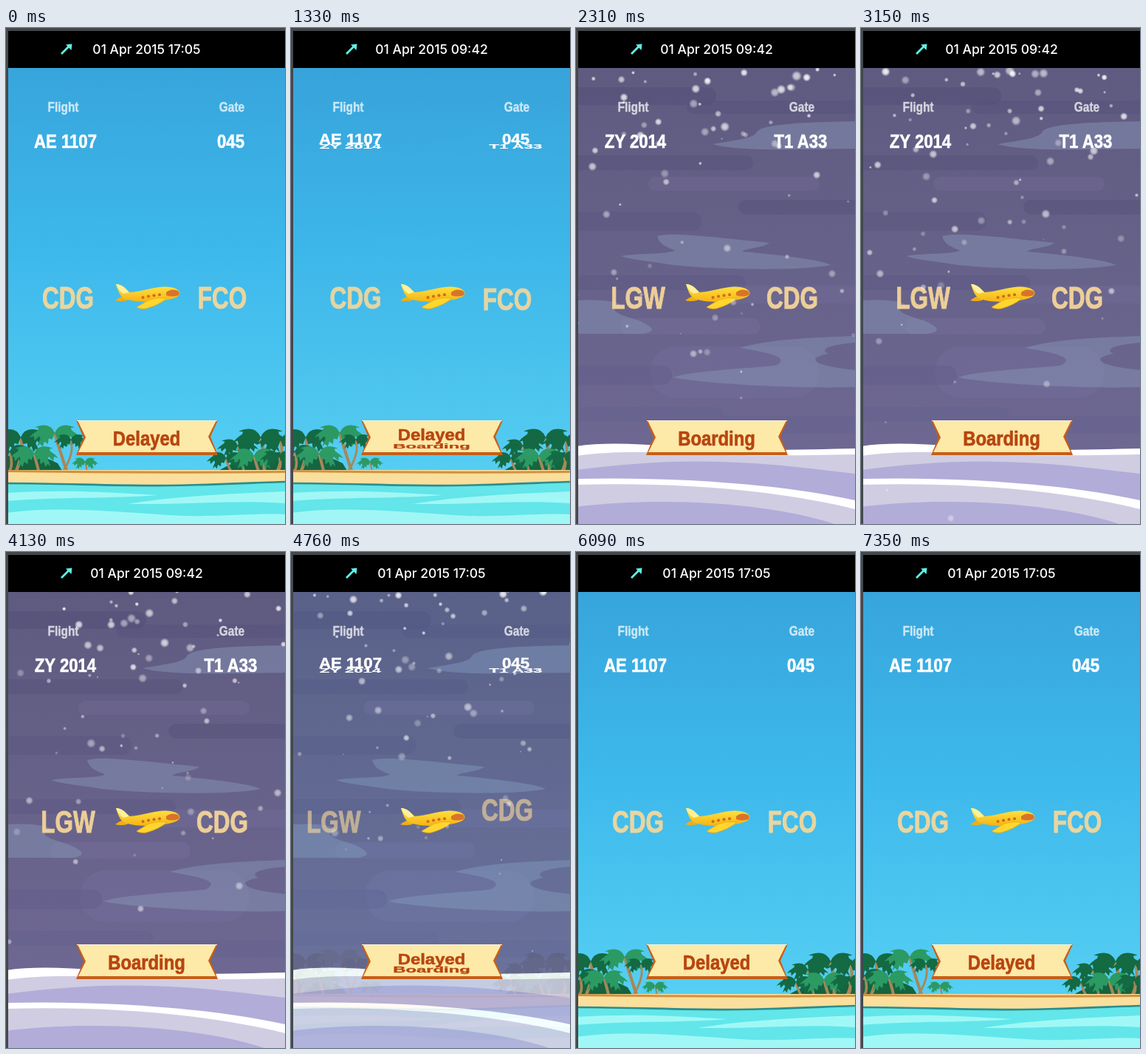
An HTML page with a canvas that plays this animation: 378x670 px, repeating every 7420 ms.

```html
<!DOCTYPE html>
<html lang="en">
<head>
<meta charset="utf-8">
<title>Flight board</title>
<style>
  html, body { margin: 0; width: 100%; height: 100%; overflow: hidden; background: #000; }
  svg, canvas { position: absolute; left: 0; top: 0; width: 378px; height: 670px; display: block; }
  text { text-anchor: middle; font-family: "Liberation Sans", Arial, sans-serif; font-weight: 700; }
  .date { font: 500 17.5px Inter, sans-serif; fill: #fff; }
</style>
</head>
<body>
<svg id="stage" viewBox="0 0 378 670">
  <defs>
    <linearGradient id="sunSky" x2="0" y2="1">
      <stop offset="0" stop-color="#37a5dc"/>
      <stop offset=".45" stop-color="#3db8eb"/>
      <stop offset="1" stop-color="#55cff3"/>
    </linearGradient>
    <linearGradient id="snowSky" x2="0" y2="1">
      <stop offset="0" stop-color="#5f5a80"/>
      <stop offset=".4" stop-color="#666188"/>
      <stop offset="1" stop-color="#706a96"/>
    </linearGradient>
    <linearGradient id="hull" x2="0" y2="1">
      <stop offset="0" stop-color="#ffe748"/>
      <stop offset="1" stop-color="#f6b312"/>
    </linearGradient>
    <path id="leaf" d="M0 0Q15-14 33 6L27 4 26 10 20 4 17 10 12 3 8 7Q4 3 0 0Z"/>
    <g id="half">
      <use href="#leaf"/>
      <use href="#leaf" transform="rotate(-26) scale(.8)"/>
      <use href="#leaf" transform="rotate(28) scale(.85)"/>
    </g>
    <g id="crown">
      <use href="#half"/>
      <use href="#half" transform="scale(-1 1)"/>
    </g>
  </defs>

  <g id="sun">
    <rect y="54" width="378" height="546" fill="url(#sunSky)"/>
    <path d="M0 578Q40 572 70 588L76 598H0ZM288 598Q320 578 378 572V598Z" fill="#14643f"/>
    <g id="palms"></g>
    <path d="M0 597H378V622H0Z" fill="#fbdf9c"/>
    <path d="M0 597Q190 600 378 598V601Q190 603 0 600Z" fill="#d0913f"/>
    <path d="M0 615C80 615 150 619 220 618S340 614 378 613V670H0Z" fill="#62e6ea"/>
    <path d="M0 615C80 615 150 619 220 618S340 614 378 613" fill="none" stroke="#2a8d8c" stroke-width="2.6"/>
    <path d="M0 628C80 623 140 627 205 631C150 636 70 633 0 639ZM165 643C230 632 310 629 378 626V642C310 637 250 644 165 643ZM0 655C70 645 150 654 240 659C300 660 340 655 378 657V670H0Z" fill="#a0f8f6"/>
  </g>

  <g id="snow">
    <rect y="54" width="378" height="616" fill="url(#snowSky)"/>
    <g id="streaks"></g>
    <g fill="#8a98b9" opacity=".46">
      <path d="M110 281C130 275 190 283 262 290C255 297 230 297 225 302C260 305 330 312 345 320C300 330 150 325 118 318C90 314 70 312 62 308C80 304 130 306 134 300C120 296 112 290 110 281Z"/>
      <path d="M185 157C210 152 240 150 245 141C250 128 330 127 378 126V163C300 164 220 167 185 157Z"/>
      <path d="M0 368C40 366 60 370 62 376C40 380 60 388 85 395C105 404 110 410 90 413H0Z"/>
      <path d="M222 432C260 420 330 418 378 416V425C340 428 330 435 342 440C310 446 320 456 378 462V485C300 488 170 480 132 472C150 464 230 460 270 456C290 446 270 440 222 432Z"/>
    </g>
    <path d="M0 565C60 556 130 567 200 570C260 571 330 569 378 568V670H0Z" fill="#fff"/>
    <path d="M0 578C60 569 130 574 200 577C260 578 330 577 378 576V670H0Z" fill="#d0cce2"/>
    <path d="M0 597C80 587 150 582 240 588C300 592 340 598 378 602V670H0Z" fill="#b2acd9"/>
    <path d="M0 609C130 606 270 615 378 638V670H0Z" fill="#fff"/>
    <path d="M0 617C130 613 270 623 378 650V670H0Z" fill="#d0cce2"/>
    <path d="M0 647C100 634 250 638 350 670H0Z" fill="#b2acd9"/>
  </g>

  <g id="codes"></g>

  <g id="plane">
    <path d="M148 368Q158 360 170 362L164 368Q155 370 148 368Z" fill="#f0ae18"/>
    <path d="M149 346Q155 346 161 351L167 357C185 356 199 350 214 349.500C226 349 236 353 235.500 358.500C235 364 223 367 208 369C190 371 168 370 158 364Q153 360 149 346Z" fill="url(#hull)"/>
    <path d="M149 346Q155 346 161 351L167 357L159 359Q152 354 149 346Z" fill="#fdf09a"/>
    <path d="M217 357Q224 351 233 355Q236 357 234 361Q224 364 217 361Z" fill="#d9732b"/>
    <path d="M194 367Q206 363 218 365Q208 374 190 379Q181 380 177 377Z" fill="#ffd62e" stroke="#eba713" stroke-width=".8"/>
    <g fill="#cf6a1c">
      <circle cx="185.500" cy="364" r="2"/><circle cx="193" cy="362.500" r="2"/>
      <circle cx="200.500" cy="361.300" r="2"/><circle cx="208" cy="360.300" r="2"/>
    </g>
  </g>

  <path d="M95 530H287L277 552 287 577H95L105 553Z" fill="#c65e18"/>
  <path d="M97 530H285L274 552 284 573H98L108 553Z" fill="#fde9a8"/>
  <path d="M96 530.500H286" stroke="#fff6da"/>
  <g id="labels"></g>

  <path d="M0 0H378V54H0Z"/>
  <path d="M0 0H378V4H3V670H0Z" fill="#45484a"/>
  <path d="M75 35L85 25" stroke="#5ff0e2" stroke-width="2.800"/>
  <path d="M81 22.500L89.500 21.500 88.500 30Z" fill="#5ff0e2"/>
  <text id="date" class="date" x="190.500" y="35"></text>
</svg>
<canvas id="flakes" width="378" height="670"></canvas>

<script>
const LOOP = 7420, STEP = 70, TO_SNOW = 1250, TO_SUN = 4500;
const DATES = ['01 Apr 2015 17:05', '01 Apr 2015 09:42'];
const $ = id => document.getElementById(id);
const clamp = v => Math.min(1, Math.max(0, v));
const easeIn = v => clamp(v) ** 1.7;
const easeOut = v => 1 - (1 - clamp(v)) ** 1.7;

function add(parent, tag, attrs, text = '') {
  const el = document.createElementNS('http://www.w3.org/2000/svg', tag);
  for (const key in attrs) el.setAttribute(key, attrs[key]);
  el.textContent = text;
  return parent.appendChild(el);
}

// Palms: x, y, scale, leaf colour, trunk base x
const DARK = '#136a43', LIGHT = '#2b9a63';
const PALMS = [
  [20, 553, 1.1, DARK, 14], [66, 547, 1.05, LIGHT, 82], [88, 556, .7, DARK, 78],
  [345, 553, 1.15, DARK, 350], [372, 557, 1, DARK, 368], [314, 564, .85, DARK, 322],
  [5, 572, .9, DARK, 5], [38, 575, 1, LIGHT, 44], [107, 586, .55, LIGHT, 107],
  [298, 581, .8, DARK, 306], [336, 578, 1, LIGHT, 342], [370, 579, .8, DARK, 366]
];
for (const [x, y, s, fill, foot] of PALMS) {
  add($('palms'), 'path', { d: `M${x} ${y}Q${x + 5} ${y + 18} ${foot} 598`,
    stroke: '#a88758', 'stroke-width': 4 * s, fill: 'none' });
  add($('palms'), 'use', { href: '#crown', transform: `translate(${x} ${y}) scale(${s})`, fill });
}

// Haze bands: left, right, y, height, colour
const BANDS = [
  [-20, 190, 80, 24, '#514c75'], [150, 420, 98, 18, '#55507a'], [-30, 240, 172, 20, '#565179'],
  [98, 330, 201, 19, '#716b95'], [220, 420, 232, 20, '#565179'], [-20, 170, 248, 26, '#5a557f'],
  [-20, 230, 334, 20, '#5c5783'], [200, 420, 348, 24, '#716b98'], [60, 250, 392, 22, '#736d99'],
  [100, 330, 430, 70, '#736d9b'], [-20, 130, 456, 26, '#625c89'], [-30, 200, 512, 20, '#655f8e'],
  [190, 420, 524, 24, '#655f8e']
];
for (const [l, r, y, h, fill] of BANDS)
  add($('streaks'), 'rect', { x: l, y, width: r - l, height: h, rx: h / 2, fill, opacity: .45 });

// Condensed bold lettering, centred on (cx, cy)
function makeLabel(parent, cx, cy, style, words) {
  const { size, narrow, fill, alpha = 1 } = style;
  const nodes = words.map(word => {
    const g = add(parent, 'g', {});
    add(g, 'text', { 'font-size': size, y: size * .358, transform: `scale(${narrow} 1)`,
      fill, stroke: fill, 'stroke-width': size * .025, opacity: alpha }, word);
    return g;
  });
  return { cx, cy, nodes };
}
const HEAD = { size: 18.4, narrow: .84, fill: '#fff', alpha: .74 };
const INFO = { size: 26.4, narrow: .84, fill: '#fff' };
const STATUS = { size: 28.4, narrow: .84, fill: '#b8450f' };
const CODE = { size: 42, narrow: .75, fill: '#f9d899', alpha: .92 };

for (const [x, word] of [[77.5, 'Flight'], [306, 'Gate']]) {
  const { cy, nodes } = makeLabel($('labels'), x, 106.5, HEAD, [word]);
  place(nodes[0], x, cy, 1, 1);
}
const cubes = [
  { ...makeLabel($('labels'), 80.5, 152.5, INFO, ['AE 1107', 'ZY 2014']), lift: 9.5 },
  { ...makeLabel($('labels'), 304.5, 152.5, INFO, ['045', 'T1 A33']), lift: 9.5 },
  { ...makeLabel($('labels'), 190.5, 553.5, STATUS, ['Delayed', 'Boarding']), lift: 15 }
];
const slides = [
  { ...makeLabel($('codes'), 84, 364, CODE, ['CDG', 'LGW']), dx: 80, dy: 0 },
  { ...makeLabel($('codes'), 293, 364, CODE, ['FCO', 'CDG']), dx: 0, dy: 50 }
];

function place(node, x, y, sy, alpha) {
  node.setAttribute('transform', `translate(${x} ${y}) scale(1 ${sy})`);
  node.setAttribute('opacity', alpha);
}

// Snow
const ctx = $('flakes').getContext('2d');
const puff = ctx.createRadialGradient(0, 0, 0, 0, 0, 1);
puff.addColorStop(0, '#fff');
puff.addColorStop(.5, 'rgba(255,255,255,.85)');
puff.addColorStop(1, 'rgba(255,255,255,0)');
const BIRTH = 34, LIFE = 3500;

function rand(seed, salt) {
  const v = Math.sin(seed * 12.9898 + salt * 78.233) * 43758.5453;
  return v - Math.floor(v);
}

function drawSnow(t, amount) {
  ctx.setTransform(1, 0, 0, 1, 0, 0);
  ctx.clearRect(0, 0, 378, 670);
  if (!amount) return;
  ctx.save();
  ctx.beginPath();
  ctx.rect(3, 54, 375, 616);
  ctx.clip();
  const last = Math.floor(t / BIRTH);
  for (let i = last; i > last - LIFE / BIRTH; i--) {
    const age = (t - i * BIRTH) / 1000;
    const speed = 20 + (rand(i, 1) - .5) * 200;
    const angle = Math.PI + (rand(i, 2) - .5) * Math.PI / 2;
    const x = rand(i, 3) * 360 + speed * Math.cos(angle) * age + 5 * age * age;
    const y = 20 + rand(i, 4) * 50 + speed * Math.sin(angle) * age + 35 * age * age;
    const r = 6.6 * (.35 + rand(i, 5) * .75 - .06 * age);
    if (r <= 0) continue;
    ctx.globalAlpha = amount * clamp(1 - rand(i, 6) * .4 - .13 * age);
    ctx.setTransform(r, 0, 0, r, x, y);
    ctx.fillStyle = puff;
    ctx.fillRect(-1, -1, 2, 2);
  }
  ctx.restore();
}

function render(t) {
  const snowing = t >= TO_SNOW && t < TO_SUN;
  const now = snowing ? 1 : 0, dir = snowing ? 1 : -1;
  const u = t < TO_SNOW ? LOOP : t - (snowing ? TO_SNOW : TO_SUN);
  const fade = easeIn(u / 1000), amount = snowing ? fade : 1 - fade;

  $('date').textContent = DATES[now];
  $('snow').setAttribute('opacity', amount);

  const turn = easeOut(u / 500);
  for (const { cx, cy, nodes, lift } of cubes) {
    place(nodes[now], cx, cy + dir * lift * (1 - turn), .1 + .9 * turn, 1);
    place(nodes[1 - now], cx, cy - dir * lift * turn, 1 - .9 * turn, turn < 1 ? 1 : 0);
  }

  const out = easeIn(u / 500), back = easeIn((u - 250) / 500);
  for (const { cx, cy, nodes, dx, dy } of slides) {
    const far = dir * (1 - back), gone = dir * out;
    place(nodes[now], cx + dx * far, cy + dy * far, 1, back);
    place(nodes[1 - now], cx + dx * gone, cy + dy * gone, 1, 1 - out);
  }
  drawSnow(t, amount);
}

const start = performance.now();
function tick() {
  const t = (performance.now() - start) % LOOP;
  render(Math.floor(t / STEP) * STEP);
  requestAnimationFrame(tick);
}
tick();
</script>
</body>
</html>
```
